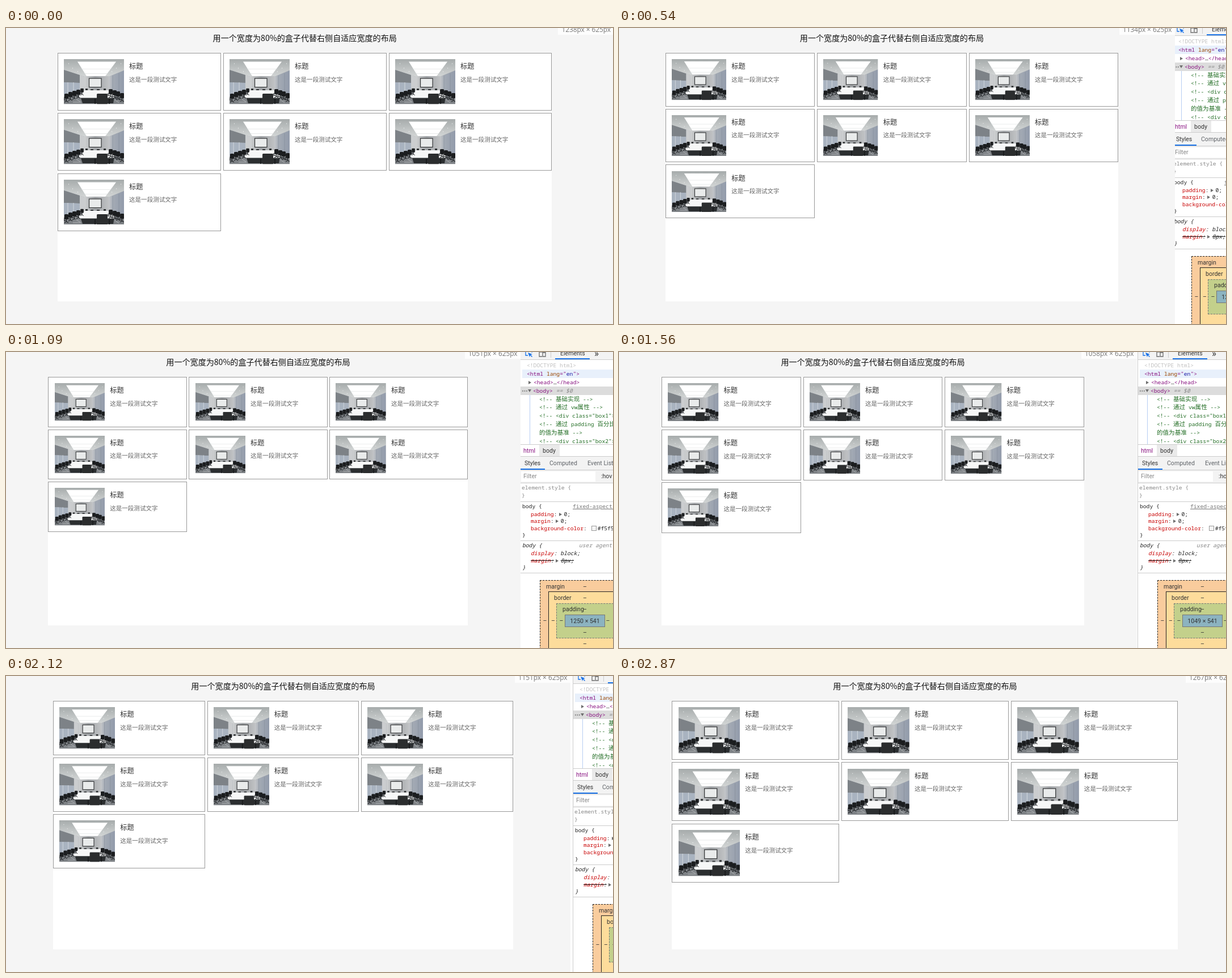
Recreate the animation shown at these times as an HTML page. Size 1070x523 px, loop 2.99 s.

```html
<!DOCTYPE html>
<html lang="zh-CN">
<head>
<meta charset="utf-8">
<title>自适应布局</title>
<style>
  * { box-sizing: border-box; }
  html, body { margin: 0; width: 100%; height: 100%; overflow: hidden; background: #fff; }
  body { position: relative; font-family: "Noto Sans CJK SC", "Noto Sans CJK", "Noto Sans", sans-serif; }
  svg { display: block; }
  .defs { position: absolute; width: 0; height: 0; }

  /* --v: width of the page in its own pixels, shown at 88 % */
  #page {
    position: absolute; left: -18px; top: 0; height: 100%; overflow: hidden;
    width: calc(var(--v) * .88px); background: #f5f5f5;
  }
  h1 {
    position: absolute; left: 0; top: 5px; width: 100%; margin: 0;
    font-size: 14.08px; font-weight: 400; line-height: 24px;
    text-align: center; white-space: nowrap; color: #111;
  }
  #grid {
    --w: calc(var(--v) * .704px);
    position: absolute; left: 10%; top: 44px; width: var(--w); height: 439px;
    display: grid; grid-template-columns: repeat(3, 33%);
    justify-content: space-between; align-content: start;
    row-gap: calc(var(--w) * .005); background: #fff;
  }
  .card { display: flex; align-items: flex-start; padding: 10.2px; border: 1px solid #999; }
  .card svg { flex: none; width: 40%; aspect-ratio: 4 / 3; }
  .card div { margin-left: 8.8px; white-space: nowrap; }
  .card b { display: block; font-size: 12.3px; font-weight: 400; line-height: 24.6px; color: #333; }
  .card span { display: block; font-size: 10.56px; line-height: 22.4px; color: #666; }
  #size {
    position: absolute; right: 0; top: 0; width: 98px; height: 12px; padding-left: 6px;
    background: rgba(255, 255, 255, .85); color: #777; white-space: nowrap;
    font: 11.8px/16px "Open Sans", "Noto Sans", sans-serif;
  }
  #size span { position: relative; top: -6px; }

  #panel {
    position: absolute; left: 0; top: 0; width: 480px; height: 100%; overflow: hidden;
    background: #fff; border-left: 1px solid #ccc;
    font: 10.56px/16px Roboto, "Noto Sans", sans-serif; color: #333;
  }
  #panel > * { position: absolute; }
  .t { white-space: pre; }
  .m { font: 9.7px/16px "Noto Sans Mono", "DejaVu Sans Mono", monospace; color: #222; }
  .m i { font: 10.56px/0 "Noto Sans CJK SC", "Noto Sans CJK", sans-serif; }
  .tag { color: #881280; }
  .tag u { color: #994500; text-decoration: none; }
  .tag s { color: #1a1aa6; text-decoration: none; }
  .note { color: #236e25; }
  .dim { color: #888; }
  .pale { color: #c0c0c0; }
  .it { font-style: italic; }
  .p { color: #c80000; }
  .off { text-decoration: line-through; }
  .link { color: #777; text-decoration: underline; }
  .mid { transform: translateX(-50%); }
  .r, .d { display: inline-block; border: 3px solid transparent; }
  .r { border-left: 5px solid #6e6e6e; border-right: 0; margin: 0 4px 0 3px; }
  .d { border-top: 5px solid #6e6e6e; border-bottom: 0; margin: 0 3px 1px 0; }
  .sw { display: inline-block; width: 9px; height: 9px; margin: 0 2px; border: 1px solid #999; background: #f5f5f5; vertical-align: -1px; }
</style>
</head>
<body>
<svg class="defs">
  <defs>
    <linearGradient id="ceil" x2="0" y2="1"><stop stop-color="#a6abab"/><stop offset="1" stop-color="#d3d6d6"/></linearGradient>
    <linearGradient id="back"><stop stop-color="#d0d2d3"/><stop offset=".45" stop-color="#a0a3a6"/><stop offset="1" stop-color="#c0c2c4"/></linearGradient>
    <linearGradient id="side"><stop stop-color="#c6c8cb"/><stop offset=".3" stop-color="#a3aab4"/><stop offset="1" stop-color="#929bab"/></linearGradient>
    <linearGradient id="floor" x2="0" y2="1"><stop stop-color="#b0b3b6"/><stop offset="1" stop-color="#7b7f83"/></linearGradient>
    <g id="seat"><rect width="7" height="9" rx="1.5" fill="#1b1d1f"/><path d="M3.5 9v5M0 15l3.5-2 3.5 2M-1 7v4h5" fill="none" stroke="#222528" stroke-width="1.2"/></g>
    <symbol id="room" viewBox="0 0 106 79.5">
      <rect width="106" height="79.5" fill="url(#floor)"/>
      <path d="M0 0H106V20L79 31H36L0 19Z" fill="url(#ceil)"/>
      <path d="M36 30H79V57H36Z" fill="url(#back)"/>
      <path d="M0 19L36 31V57L0 66Z" fill="#b4b9bf"/>
      <path d="M0 19L28 28V42L0 41Z" fill="#7d8287"/>
      <path d="M0 41L28 42V57L0 64Z" fill="#a9b3c0"/>
      <path d="M7 41V63M17 41V60" stroke="#ccd2d9" stroke-width="1.200"/>
      <path d="M28 28L36 31V56H28Z" fill="#cbcdcf"/>
      <path d="M79 31L106 20V66L79 57Z" fill="url(#side)"/>
      <path d="M86 29V58M97 25V62" stroke="#858e9b" stroke-width=".7"/>
      <path d="M24 4.500H92L73 30H40Z" fill="#fff"/>
      <path d="M31 17.500H83M36 25.500H77" stroke="#d9dcdc" stroke-width=".6"/>
      <path d="M8 8h1M15 16h1M24 22h1M100 8h1M92 16h1M84 22h1" stroke="#fff"/>
      <rect x="44.500" y="34" width="21.500" height="15.500" fill="#e9ebeb" stroke="#303234" stroke-width="1.200"/>
      <path d="M38 52h4v4h-4zM47 53h5v3h-5zM58 53h5v3h-5zM70 52h4v4h-4z" fill="#303335"/>
      <path d="M29 66H89L87 78H33Z" fill="#2b2e30"/>
      <path d="M37 55H79L91 65V68.500H27V65Z" fill="#f6f7f7"/>
      <use href="#seat" x="29" y="52" transform="translate(6 10) scale(.8)"/>
      <use href="#seat" x="22" y="54"/><use href="#seat" x="15" y="56"/><use href="#seat" x="8" y="58"/><use href="#seat" x="1" y="61"/>
      <use href="#seat" x="79" y="53"/><use href="#seat" x="86" y="55"/><use href="#seat" x="92" y="57"/><use href="#seat" x="99" y="60"/>
      <path d="M20 70l9 5M16 76h14M90 72l7 5" stroke="#c4c7c9" stroke-width=".7"/>
      <rect x="58" y="61" width="19" height="18.500" rx="1.500" fill="#2b2d2e"/>
      <path d="M55 70v9M80 70v9" stroke="#191b1c" stroke-width="2"/>
    </symbol>
  </defs>
</svg>

<div id="panel"></div>
<div id="page">
  <h1>用一个宽度为80%的盒子代替右侧自适应宽度的布局</h1>
  <div id="grid"></div>
  <div id="size"><span></span></div>
</div>

<script>
const $ = s => document.querySelector(s);
const panel = $('#panel'), page = $('#page'), size = $('#size span');

$('#grid').innerHTML = ('<div class="card"><svg><use href="#room"/></svg>' +
  '<div><b>标题</b><span>这是一段测试文字</span></div></div>').repeat(7);

// Inspector parts; x counts from the panel's left edge
const box = (x, y, w, h, css) =>
  `<div style="left:${x - 1}px;top:${y}px;width:${w}px;height:${h}px;${css}"></div>`;
const fill = (x, y, w, h, color) => box(x, y, w, h, 'background:' + color);
const line = y => fill(1, y, 480, 1, '#ccc');
const text = (x, y, cls, html) =>
  `<div class="t ${cls}" style="left:${x - 1}px;top:${y - 8}px">${html}</div>`;
const tag = s => `<span class="tag">&lt;${s}&gt;</span>`;
const rule = (name, value) => `<span class="p">${name}</span>:${value}`;
const arrow = '<span class="r"></span>';
const dash = (x, y) => text(x, y, 'mid', '–');

panel.innerHTML = [
  fill(1, 0, 480, 13, '#f3f3f3'), line(13),
  `<svg width="60" height="14" style="left:0;top:0" fill="none">
    <path d="M13 6H9V-3H20V1" stroke="#1a73e8" stroke-width="1.3"/>
    <path d="M13 1l8 3-3 1 3 3-1 1-3-3-1 3z" fill="#1a73e8"/>
    <path d="M33 -3V8H38M33 0H44V-3M39 1h5v7h-5z" stroke="#6e6e6e" stroke-width="1.3"/>
    <path d="M53.5 0V10" stroke="#ccc"/></svg>`,
  text(71, 3, '', 'Elements'), fill(62, 11, 61, 2, '#1a73e8'),
  text(131, 2, '', '<span style="font-size:17px">»</span>'),

  fill(4, 31, 480, 15, '#e8f0fb'), fill(1, 61, 480, 15, '#dcdcdc'),
  fill(17, 76, 1, 87, '#b7cdf3'),
  text(12, 23.5, 'm pale', '&lt;!DOCTYPE html&gt;'),
  text(12, 38.5, 'm', tag('html <u>lang</u>="<s>en</s>"')),
  text(12, 53.5, 'm', arrow + tag('head') + '…' + tag('/head')),
  text(2, 68.5, 'm dim', '<span style="letter-spacing:-2.3px">•••</span>'),
  text(14, 68.5, 'm', '<span class="d"></span>' + tag('body') + '<span class="dim it"> == $0</span>'),
  ...['&lt;!-- <i>基础实现</i> --&gt;', '&lt;!-- <i>通过</i> vw<i>属性</i> --&gt;',
    '&lt;!-- &lt;div class="box1"&gt;&lt;/div&gt; --&gt;', '&lt;!-- <i>通过</i> padding <i>百分比</i>',
    '<i>的值为基准</i> --&gt;', '&lt;!-- &lt;div class="box2"&gt;&lt;/div&gt; --&gt;'
  ].map((s, i) => text(34, 83.5 + i * 14.85, 'm note', s)),

  fill(1, 163, 480, 21, '#fff'), line(163), fill(34, 164, 36, 20, '#eaeaea'),
  text(6, 175, 'tag', 'html'), text(40, 175, '', 'body'),
  fill(1, 184, 480, 47, '#f3f3f3'), line(184), line(208),
  text(8, 197, '', 'Styles'), fill(1, 206, 43, 2, '#1a73e8'),
  text(52, 197, '', '<span style="color:#5f6368">Computed</span>'),
  text(119, 197, '', '<span style="color:#5f6368">Event Listeners</span>'),
  fill(2, 211, 131, 18, '#fff'), text(6, 220, 'dim', 'Filter'),
  text(143, 220, '', ':hov'), line(231),

  text(3, 240, 'm dim', 'element.style {'), text(3, 254, 'm dim', '}'), line(264),
  text(4, 272.5, 'm', 'body {'), text(93, 272.5, 'm link', 'fixed-aspect.html:9'),
  text(19, 287, 'm', rule('padding', arrow + '0;')),
  text(19, 299, 'm', rule('margin', arrow + '0;')),
  text(19, 311.5, 'm', rule('background-color', ' <span class="sw"></span>#f5f5f5;')),
  text(4, 323.5, 'm', '}'), line(333),
  text(4, 342, 'm it', 'body {'), text(104, 342, 'm it dim', 'user agent stylesheet'),
  text(19, 356, 'm it', rule('display', ' block;')),
  text(19, 368.5, 'm it off', rule('margin', arrow + '8px;')),
  text(4, 380.5, 'm it', '}'), line(390),

  box(35, 403, 159, 142, 'background:#f9cc9d;border:1px dashed #222'),
  box(50, 423, 129, 102, 'background:#fddc9b;border:1px solid #222'),
  box(64, 444, 101, 62, 'background:#c3d08b;border:1px dashed #777'),
  box(79, 464, 71, 22, 'background:#8cb3c0;border:1px solid #777'),
  text(46, 415, '', 'margin'), text(60, 435, '', 'border'), text(75, 455, '', 'padding'),
  ...[415, 435, 455, 496, 516].map(y => dash(114.5, y)),
  ...[44, 58.5, 73, 155, 169, 184].map(x => dash(x, 475)),
  text(114.5, 475.5, 'mid', '<span id="inner"></span>')
].join('');
const inner = $('#inner');

const steps = [0, 70, 150, 220, 300, 380, 460, 540, 620, 700, 780, 850, 930, 1010, 1090, 1170,
  1560, 1650, 1830, 1900, 1970, 2040, 2120, 2210, 2280, 2390, 2440, 2550, 2620, 2800, 2870];
// [time, page width, panel's lead over the page edge]
const keys = [[0, 1238, 0], [540, 1134, -6], [1090, 1051, -1], [1170, 1049, 0], [1560, 1058, 1],
  [1650, 1070, 0], [1830, 1078, .5], [2120, 1151, 4.5], [2280, 1182, 5], [2440, 1218, 8],
  [2620, 1239, 8], [2870, 1267, 8]];

function pose(t) {
  const i = keys.findIndex(k => k[0] >= t);
  if (i < 1) return keys[0];
  const a = keys[i - 1], b = keys[i], f = (t - a[0]) / (b[0] - a[0]);
  return a.map((n, j) => n + (b[j] - n) * f);
}

function draw() {
  const now = performance.now() % 2990;
  const [, width, lead] = pose(steps.findLast(s => s <= now));
  const v = Math.round(width);
  page.style.setProperty('--v', v);
  panel.style.left = Math.round(v * .88 - 18 + lead) + 'px';
  size.textContent = v + 'px × 625px';
  inner.textContent = (now < 1320 ? 1250 : 1049) + ' × 541';
  requestAnimationFrame(draw);
}
draw();
</script>
</body>
</html>
```
